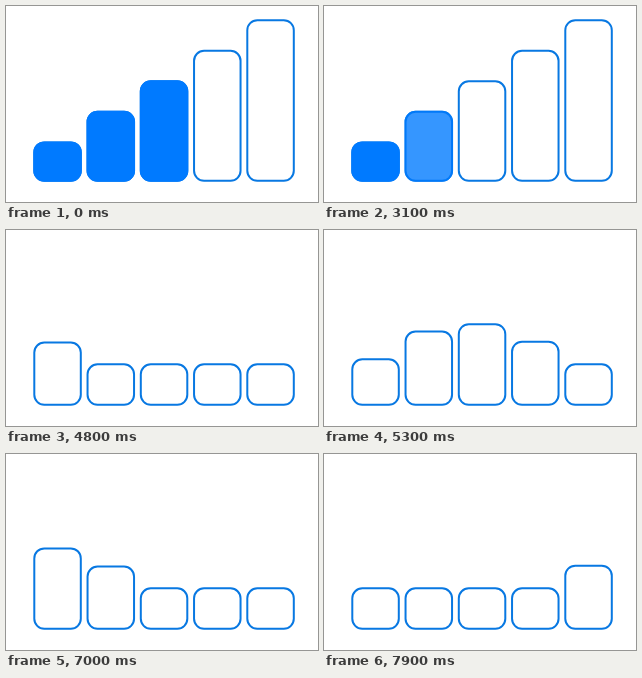
Animation, 312 px wide and 196 px high, one loop 8 s. Source, as an HTML page:

```html
<!DOCTYPE html>
<html lang="en">
<head>
<meta charset="utf-8">
<title>Signal bars</title>
<style>
  html, body { margin: 0; width: 100%; height: 100%; overflow: hidden; background: #fff; }
  svg { display: block; width: 100vw; height: 100vh; }
  .line { fill: none; stroke: #0878e2; stroke-width: 2; }
  .full { fill: #007aff; stroke: #007aff; stroke-width: 2; }
</style>
</head>
<body>
<svg viewBox="0 0 312 196"></svg>
<script>
const LOOP = 8000, STEP = 100;
const BASE = 174.8, LOW = 134.3, PEAK = 40.7;
const WAVES = [4685, 6720], LAG = 165, BUMP = 640;

// Fill fades: [start, end, bar, target opacity]
const FADES = [
  [20, 300, 3, 1],
  [420, 800, 4, 1],
  [1020, 1300, 4, 0],
  [2110, 2200, 3, 0],
  [2420, 2700, 2, 0],
  [3020, 3400, 1, 0],
  [3620, 4000, 0, 0]
];

const svg = document.querySelector('svg');
const progress = (t, a, b) => Math.min(1, Math.max(0, (t - a) / (b - a)));
const ease = p => (1 - Math.cos(Math.PI * p)) / 2;

function addRect(cls, i) {
  const r = document.createElementNS('http://www.w3.org/2000/svg', 'rect');
  const attrs = { class: cls, x: 28.3 + 53.25 * i, width: 46.5, rx: 10 };
  for (const k in attrs) r.setAttribute(k, attrs[k]);
  return svg.appendChild(r);
}

const bars = [0, 1, 2, 3, 4].map(i => ({ line: addRect('line', i), full: addRect('full', i) }));

function topOf(i, t) {
  const high = 136.4 - 30.55 * i;
  const rest = high + (LOW - high) * ease(progress(t, 4320, 4700));
  const lift = WAVES.reduce((sum, start) =>
    sum + Math.sin(Math.PI * progress(t, start + LAG * i, start + LAG * i + BUMP)), 0);
  return rest - PEAK * lift;
}

function fillOf(i, t) {
  let v = i < 3 ? 1 : 0;
  for (const [a, b, bar, to] of FADES)
    if (bar === i) v += (to - v) * progress(t, a, b);
  return v;
}

function draw() {
  const t = Math.floor(performance.now() % LOOP / STEP) * STEP;
  bars.forEach(({ line, full }, i) => {
    const y = topOf(i, t);
    for (const r of [line, full]) {
      r.setAttribute('y', y);
      r.setAttribute('height', BASE - y);
    }
    full.setAttribute('opacity', fillOf(i, t));
  });
  requestAnimationFrame(draw);
}
draw();
</script>
</body>
</html>
```
